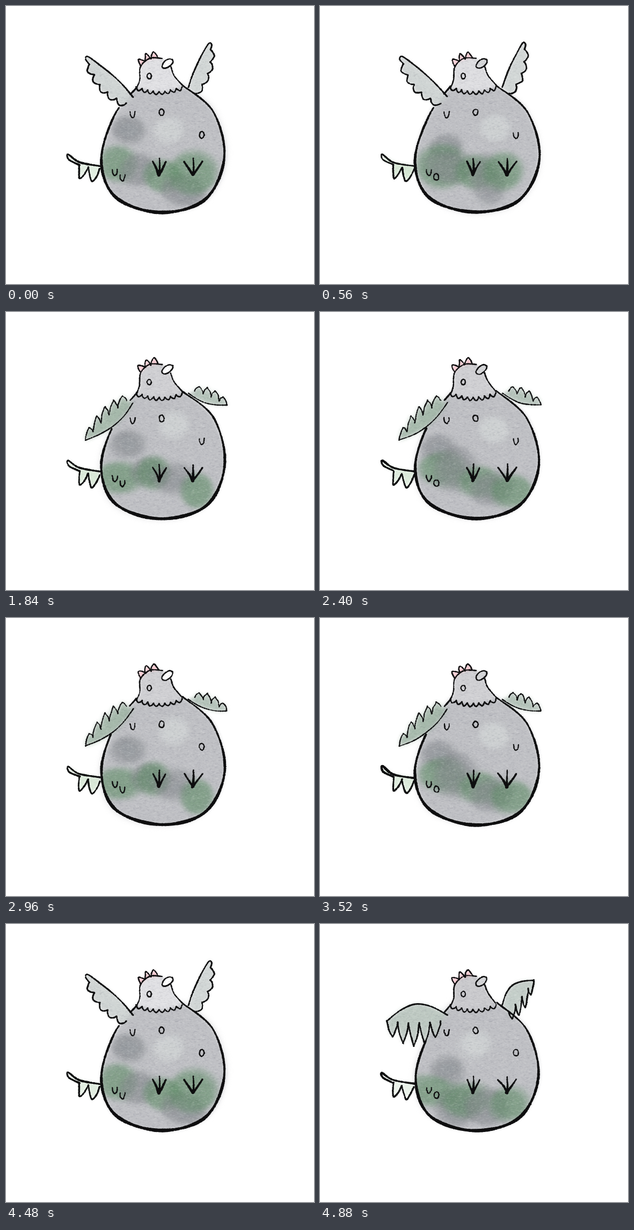
An HTML page with a canvas for the animation above (4.96 s loop, 574 by 520 pixels).

```html
<!DOCTYPE html>
<html>
<head>
<meta charset="utf-8">
<title>Flapping hen</title>
<style>
html, body { margin: 0; width: 574px; height: 520px; overflow: hidden; background: #fff; }
canvas { display: block; }
</style>
</head>
<body>
<canvas id="stage" width="574" height="520"></canvas>
<script>
const W = 574, H = 520, STEP = 80, STEPS = 62;
const ctx = document.getElementById('stage').getContext('2d');
const layer = () => Object.assign(document.createElement('canvas'), { width: W, height: H }).getContext('2d');
const wash = layer(), grain = layer();

let seed = 1;
const rnd = () => {
  seed = (seed + 0x6D2B79F5) | 0;
  let t = Math.imul(seed ^ (seed >>> 15), 1 | seed);
  t = (t + Math.imul(t ^ (t >>> 7), 61 | t)) ^ t;
  return ((t ^ (t >>> 14)) >>> 0) / 4294967296;
};
const spread = r => (rnd() * 2 - 1) * r;
const arch = t => Math.sin(Math.PI * t);
const mix = (a, b, t) => [a[0] + (b[0] - a[0]) * t, a[1] + (b[1] - a[1]) * t];

// ---- geometry ----
function curve(p) {
  const out = [];
  for (let i = 0; i < p.length - 1; i++) {
    const a = p[i - 1] || p[i], b = p[i], c = p[i + 1], d = p[i + 2] || c;
    const n = Math.ceil(Math.hypot(c[0] - b[0], c[1] - b[1]) / .7);
    for (let k = 0; k < n; k++) {
      const t = k / n;
      out.push([0, 1].map(j => b[j] + .5 * t * (c[j] - a[j] + t * (2 * a[j] - 5 * b[j] + 4 * c[j] - d[j] + t * (3 * (b[j] - c[j]) + d[j] - a[j])))));
    }
  }
  out.push(p[p.length - 1]);
  return out;
}

// One rounded lobe between each pair of neighbouring corners.
function lobes(corners, depth) {
  return corners.slice(1).map((b, i) => {
    const a = corners[i], dx = b[0] - a[0], dy = b[1] - a[1], k = depth / Math.hypot(dx, dy);
    return [0, .2, .5, .8, 1].map(t => [a[0] + dx * t - dy * k * arch(t), a[1] + dy * t + dx * k * arch(t)]);
  });
}

// Points on a tilted ellipse, starting at angle `from`.
const ring = (x, y, rx, ry, tilt = 0, from = 0, sweep = Math.PI * 2) => Array.from({ length: 9 }, (_, i) => {
  const a = from + sweep * i / 8, u = rx * Math.cos(a), v = ry * Math.sin(a);
  return [x + u * Math.cos(tilt) - v * Math.sin(tilt), y + u * Math.sin(tilt) + v * Math.cos(tilt)];
});

// ---- shapes ----
const BODY = [[244, 151], [203, 205], [178, 288], [204, 358], [288, 386], [372, 362], [408, 285], [386, 198], [329, 148]];
const HEAD = [[243, 153], [249, 138], [251, 114], [268, 98], [291, 98], [307, 114], [313, 130], [328, 148]];
const TAIL = [[177, 299], [137, 292], [116, 278], [118, 288], [137, 297]];
const COLLAR = Array.from({ length: 9 }, (_, i) => [243 + i * 10.6, 151 + 9 * arch(i / 8)]);
const SPOTS = [[236, 202], [290, 199], [365, 241], [203, 310], [217, 320]];
const COMB = lobes([[251, 113], [260, 103], [270, 99], [284, 97]], -12);
const TAIL_LOBES = lobes([[137, 297], [153, 302], [175, 305]], 25);
const BEAK = ring(301, 107.5, 12, 6.5, -.65);

// Lift of each wing in degrees, bow of the smooth edge and feather size relative to the wing, amount of green.
const POSES = [
  { lift: [42, 65], bow: .04, feather: .08, green: .1 },
  { lift: [4, 38], bow: .12, feather: .08, green: .4 },
  { lift: [-38, -17], bow: -.1, feather: -.17, green: .55, pointed: true },
  { lift: [-28, -8], bow: .12, feather: .2, green: .45, pointed: true },
  { lift: [-17, 16], bow: .18, feather: .26, green: .35, pointed: true },
  { lift: [-6, 39], bow: .23, feather: .32, green: .3, pointed: true },
  { lift: [28, 53], bow: .15, feather: .09, green: 1 },
];

function buildWing(side, { lift, bow, feather, pointed }) {
  const s = side ? 1 : -1, shoulder = side ? [340, 152] : [237, 170];
  const size = side ? (pointed ? 75 : 91) : 113;
  const angle = lift[side] * Math.PI / 180, flip = Math.sign(feather);
  const along = [s * Math.cos(angle), -Math.sin(angle)], up = [along[1] * s, -along[0] * s];
  const at = (a, u) => [0, 1].map(j => shoulder[j] + (along[j] * a + up[j] * u) * size);
  const edge = [0, .25, .5, .75, 1].map(t => at(t, bow * arch(t)));
  let start = at(1, 0);
  if (!pointed) {
    start = at(.9, -.08);
    edge.push(at(1, -.06), start);
  }
  const root = [shoulder[0] + s * 12, shoulder[1] + (flip > 0 ? 12 : -4)];
  const count = side ? 4 : 5, belly = pointed ? .03 : .11;
  const corners = Array.from({ length: count + 1 }, (_, i) => {
    const p = mix(start, root, i / count), out = -flip * belly * size * arch(i / count);
    return [p[0] + up[0] * out, p[1] + up[1] * out];
  });
  const feathers = pointed
    ? corners.slice(1).flatMap((b, i) => {
      const mid = mix(corners[i], b, .5);
      const tip = [mid[0], mid[1] + feather * size * (.6 + .6 * arch((i + .5) / count))];
      return lobes([corners[i], tip, b], -s * flip * 1.5);
    })
    : lobes(corners, -s * feather * size);
  return { lines: [edge, ...feathers], fill: [...curve(edge), ...feathers.flat()] };
}

// ---- brushes ----
function ink(keys, width, wobble = .8) {
  const phase = rnd() * 6;
  ctx.beginPath();
  curve(keys.map(([x, y]) => [x + spread(wobble), y + spread(wobble)])).forEach(([x, y], i) => {
    const w = typeof width === 'function' ? width(x, y) : width;
    if (!w) return;
    const r = w / 2 * (1 + .13 * Math.sin(i / 17 + phase)) + spread(.35);
    x += spread(.25);
    ctx.moveTo(x + r, y);
    ctx.arc(x, y, r, 0, 7);
  });
  ctx.fill();
}

function trace(p) {
  wash.beginPath();
  p.forEach(q => wash.lineTo(...q));
  wash.closePath();
}

function paint(p, color, blur = 2, alpha = 1) {
  wash.filter = `blur(${blur}px)`;
  wash.globalAlpha = alpha;
  wash.fillStyle = color;
  trace(p);
  wash.fill();
  wash.filter = 'none';
  wash.globalAlpha = 1;
}

const blob = (x, y, rx, ry, color) => {
  for (let i = 0; i < 3; i++)
    paint(curve(ring(x + spread(rx * .25), y + spread(ry * .25), rx, ry, spread(.4))), color, 4, .26);
};

// ---- scene ----
function paintWash(index, pose, wings) {
  const GREEN = '#5f8b67', DARK = '#85868c', LIGHT = '#d9dadd';
  seed = 900 + index * 31;
  wash.clearRect(0, 0, W, H);
  const body = curve(BODY), drift = [spread(5), spread(4)];
  paint(body.map(([x, y]) => [x + drift[0], y + drift[1]]), '#c8c9cc', 6, .35);
  paint(body, '#bfc0c4', 3);
  wash.save();
  trace(body);
  wash.clip();
  blob(300 + spread(50), 230 + spread(25), 28, 24, LIGHT);
  blob(225 + spread(15), 250 + spread(25), 30, 24, DARK);
  for (let i = 0; i < 5; i++)
    blob(218 + i * 34 + spread(14), 318 + spread(26), 26 + rnd() * 20, 24 + rnd() * 18, i % 2 ? DARK : GREEN);
  wash.restore();
  const tone = 190 + rnd() * 38;
  paint(curve([...HEAD, ...COLLAR.slice().reverse()]), `rgb(${tone},${tone},${tone + 3})`);
  COMB.forEach(p => paint(p, '#f5aab5', 2, .65));
  paint(BEAK, rnd() < .5 ? '#d4d5d7' : '#fff', 1);
  paint([...TAIL, ...TAIL_LOBES.flat()], '#b9d6b6', 3, .3 + rnd() * .4);
  wings.forEach(({ fill }, side) => {
    paint(fill, '#d3d5d6', 2, .85);
    paint(fill, GREEN, 4, POSES[pose].green * (side ? .55 : .75));
  });
  wash.globalCompositeOperation = 'source-atop';
  wash.drawImage(grain.canvas, 0, 0);
  wash.globalCompositeOperation = 'source-over';
}

function drawInk(index, pose, wings) {
  seed = 5000 + index * 77;
  ctx.fillStyle = '#0e0e0f';
  // The outline breaks where the left wing covers it and grows heavier towards the ground.
  const gapEnd = POSES[pose].pointed ? 218 : 190;
  ink(BODY, (x, y) => x < 235 && y > 165 && y < gapEnd ? 0 : 2.8 + Math.max(0, y - 160) / 78, 1.3);
  ink(HEAD.slice(0, 5), 2.3, .6);
  ink(HEAD.slice(5), 2.4, .6);
  ink(BEAK, 2.4, .5);
  COMB.forEach(p => ink(p, 2.4));
  lobes(COLLAR, 6).forEach(p => ink(p, 2.5, .5));
  ink(ring(267, 131, 4, 5), 2.3, .3);
  SPOTS.forEach(([x, y], i) => {
    const open = i % 3 === 0 || (i > 1 && rnd() < .5);
    ink(open ? ring(x, y - 4, 4.5, 11, 0, 0, Math.PI) : ring(x, y, 4.5, 6), 2.2, .6);
  });
  for (const [x, reach] of [[286, 12], [349, 17]])
    for (const side of [-1, 0, 1])
      ink([[x + side * reach, side ? 291 : 285], [x + side * reach * .45, 304], [x - 1, 316]], (_, y) => 2.3 + (y - 284) / 13);
  ink(TAIL, 2.8 + rnd() * 1.4);
  TAIL_LOBES.forEach(p => ink(p, 3));
  wings.forEach(({ lines }) => lines.forEach(p => ink(p, pose === 2 ? 2 : 2.7, .6)));
}

function draw(step) {
  const pose = step % 7, wings = [0, 1].map(side => buildWing(side, POSES[pose]));
  ctx.fillStyle = '#fff';
  ctx.fillRect(0, 0, W, H);
  paintWash(step % 14, pose, wings);
  ctx.drawImage(wash.canvas, 0, 0);
  drawInk(step % 28, pose, wings);
}

// Paper tooth: short faint flecks.
for (let i = 0; i < 16000; i++) {
  grain.fillStyle = rnd() < .5 ? 'rgba(255,255,255,.08)' : 'rgba(70,70,80,.05)';
  grain.fillRect(110 + rnd() * 310, 70 + rnd() * 330, 1.5 + rnd() * 3, 1.4);
}

let shown = -1;
const start = performance.now();
function tick() {
  const step = Math.floor((performance.now() - start) / STEP) % STEPS;
  if (step !== shown) draw(shown = step);
  requestAnimationFrame(tick);
}
tick();
</script>
</body>
</html>
```
